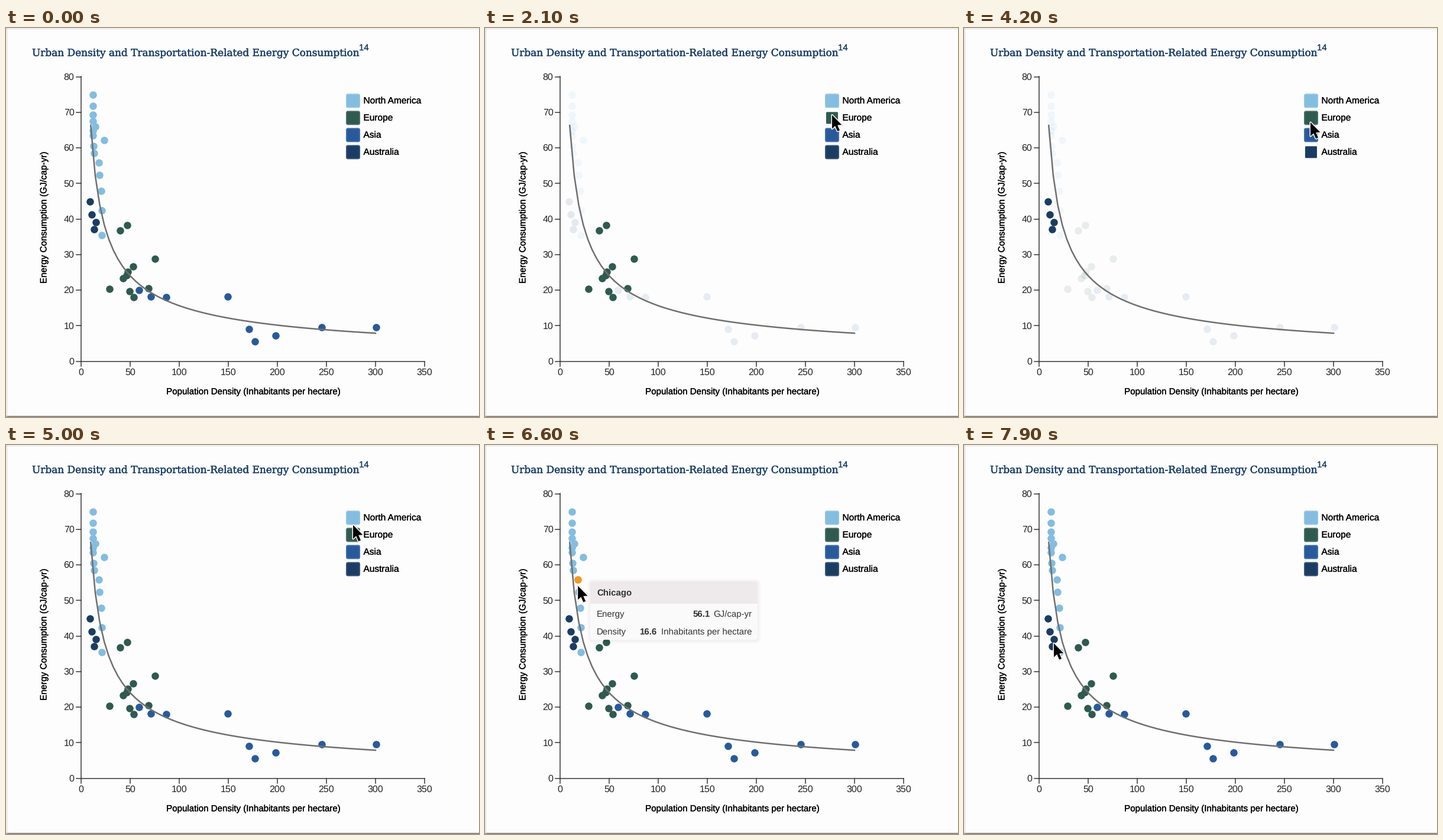
These frames come from a looping animation (800 by 659 pixels, 8 s). A matplotlib script:

```python
import numpy as np
import matplotlib.pyplot as plt
from matplotlib.animation import FuncAnimation
from matplotlib.patches import FancyBboxPatch, Polygon, Rectangle
from matplotlib.patheffects import withStroke

W, H, DPI = 800, 659, 64
FRAMES, STEP = 80, 100
SANS, SERIF = "Liberation Sans", "DejaVu Serif"
INK, NAVY, ORANGE, PAPER = "#222222", "#1d3f67", "#f5981d", "#fdfdfd"
X0, Y0, DX, DY = 127, 564.5, 1.66, 6.025
FADED = 0.1

plt.rcParams["text.hinting"] = "none"
plt.rcParams["text.hinting_factor"] = 1


def pt(px):
    return px * 72 / DPI


def to_px(x, y):
    return X0 + DX * x, Y0 - DY * y


fig = plt.figure(figsize=(W / DPI, H / DPI), dpi=DPI, facecolor=PAPER)
ax = fig.add_axes([0, 0, 1, 1])
ax.set(xlim=(0, W), ylim=(H, 0))
ax.axis("off")


def line(xs, ys, color="#333333", width=1.5, **kw):
    ax.plot(xs, ys, color=color, lw=pt(width), **kw)


def text(x, y, s, size, color=INK, font=SANS, bolder=0, **kw):
    kw.setdefault("va", "baseline")
    label = ax.text(x, y, s, fontsize=pt(size), color=color, family=font, **kw)
    if bolder:
        label.set_path_effects([withStroke(linewidth=pt(bolder), foreground=color)])
    return label


def rounded(x, y, w, h, r, **kw):
    style = f"round,pad=0,rounding_size={r}"
    return ax.add_patch(FancyBboxPatch((x, y), w, h, boxstyle=style, lw=0, **kw))


# Page edges
line([0, W], [0.5, 0.5], "#dcdcdc", 1)
for x in (0.5, W - 0.5):
    line([x, x], [0, H], "#d2d2d2", 1)
ax.add_patch(Rectangle((0, 657), W, 2, color="#8c8c8c", lw=0))

# Titles and axes
text(44, 47.5, "Urban Density and Transportation-Related Energy Consumption",
     16.93, NAVY, SERIF, 0.45)
text(597, 38, "14", 15, NAVY, bolder=0.2)
text(417.5, 620.5, "Population Density (Inhabitants per hectare)", 15.1,
     "black", bolder=0.25, ha="center")
text(64.5, 323.5, "Energy Consumption (GJ/cap-yr)", 15.3, "black", bolder=0.25,
     ha="center", va="center", rotation=90)
line([X0, X0], [82, Y0])
line([X0, 708], [Y0, Y0])
for v in range(0, 81, 10):
    y = to_px(0, v)[1]
    line([X0 - 8, X0], [y, y])
    text(115.5, y + 5.2, v, 16, ha="right")
for v in range(0, 351, 50):
    x = to_px(v, 0)[0]
    line([x, x], [Y0, Y0 + 8])
    text(x, 587.5, v, 16, ha="center")


def trend(density):
    return 66.3 * (9.8 / density) ** 0.6226


dens = np.linspace(9.8, 300, 64)
line(*to_px(dens, trend(dens)), "#6f6f6f", 2.5, zorder=4)


# Cities as (densities, energies)
def america():
    """A steep column that falls off at both ends and leans right below."""
    i = np.arange(15)
    u = (i - 7) / 7
    energy = 62.2 - 10.2 * u - 7 * u**2 - 9.5 * u**3
    lean = 9.4 / (1 + np.exp(1.3 * (10.4 - i)))
    spikes = 11.5 * np.exp(-((i - 7) / 2.5) ** 2) * (i % 3 == 1)
    return 12 + lean + spikes, energy


def australia():
    i = np.arange(4)
    turn = i * np.pi / 2
    return 12 - 2.9 * np.cos(turn) - np.sin(turn), 44.9 - 3.6 * i**0.71


def europe():
    return ([46.7, 40, 75, 53.2, 47.3, 46.1, 42.5, 28.7, 49.1, 68.5, 53.7],
            [38.2, 36.7, 28.8, 26.7, 25.2, 24.1, 23.3, 20.3, 19.7, 20.5, 18])


def asia():
    return ([59, 71, 87, 149.4, 171, 177, 198, 245, 300.5],
            [20, 18.2, 18, 18.1, 9, 5.5, 7.3, 9.5, 9.5])


REGIONS = {
    "North America": ("#83bde0", america),
    "Europe": ("#2f5a50", europe),
    "Asia": ("#285a9b", asia),
    "Australia": ("#1b3d63", australia),
}

spots, dots, frames, legend_y = {}, {}, {}, {}
for i, (name, (color, cities)) in enumerate(REGIONS.items()):
    spots[name] = np.column_stack(to_px(*map(np.array, cities())))
    dots[name] = ax.scatter(*spots[name].T, s=pt(12.5) ** 2, color=color, lw=0,
                            zorder=3)
    cy = legend_y[name] = 123.3 + 29 * i
    frames[name] = rounded(575, cy - 12, 24, 24, 3.5, color=color, alpha=0.88)
    rounded(577, cy - 10, 20, 20, 1.5, color=color)
    text(604.5, cy + 4.5, name, 15.45, "black", bolder=0.25)
hot = ax.scatter([0], [0], s=pt(12.5) ** 2, color=ORANGE, lw=0, zorder=3.5)

# Tooltip parts with their offsets from its corner
TIP_W, TIP_H, HEAD = 283, 99, 38
tip_parts = []


def tip_box(x, y, w, h, r, color, alpha, z):
    box = rounded(x, y, w, h, r, color=color, alpha=alpha, zorder=z)
    tip_parts.append((box, x, y))


def tip_text(x, y, s="", **kw):
    label = text(x, y, s, 15.35, "#333333", zorder=7, **kw)
    tip_parts.append((label, x, y))
    return label


for g in range(6, 0, -1):
    tip_box(-g, 1 - g, TIP_W + 2 * g, TIP_H + 2 * g, 5 + g, "black", 0.009, 5)
tip_box(0, 0, TIP_W, TIP_H, 5, "#fcfbfb", 0.92, 6)
tip_box(0, 0, TIP_W, HEAD, 5, "#eeeaeb", 1, 6.1)
tip_box(0, HEAD - 7, TIP_W, 7, 0.01, "#eeeaeb", 1, 6.1)
city = tip_text(11, 24.5, weight="bold")
tip_text(11, 59.5, "Energy")
tip_text(11, 90, "Density")
energy = tip_text(202.3, 59.5, weight="bold", ha="right")
density = tip_text(112.3, 90, weight="bold", ha="right")
tip_text(273, 59.5, "GJ/cap-yr", ha="right")
tip_text(273, 90, "Inhabitants per hectare", ha="right")

# Mouse pointer: soft shadow, white rim, black body
ARROW = np.array([(0, 0), (0, 23.5), (5.2, 18.6), (9.2, 27.6), (13, 26),
                  (9.2, 17.2), (16.4, 16.8)])
pointer = [ax.add_patch(Polygon(ARROW, color=c, lw=pt(w), alpha=a,
                                joinstyle="round", zorder=8))
           for c, w, a in (("black", 4.5, 0.12), ("white", 3, 1), ("black", 0, 1))]

# Schedule in tenths of a second: (first, last, ...)
HOVERS = [(8, 22, "Europe"), (23, 33, "Asia"), (34, 42, "Australia"),
          (43, 49, "North America")]
TIPS = [(59, 66, "Chicago", 56.1, 16.6, 10), (68, 72, "Calgary", 47.1, 20.8, 12)]


def pointer_stops():
    """Enter, rest on each legend swatch, visit both cities, drift down."""
    stops = [(5, 668, 560)]
    for first, last, name in HOVERS:
        y = legend_y[name]
        stops += [(first, 585, y - 9), (last - 1, 587, y - 5)]
    stops.append((50, 587, 135.5))
    for first, last, *_, i in TIPS:
        x, y = spots["North America"][i]
        stops.append((first, x - 1, y - 2))
    stops.insert(-1, (65, *stops[-2][1:]))
    return np.array(stops + [(79, 152, 336)])


STOPS = pointer_stops()


def pointer_at(k):
    i = np.clip(np.searchsorted(STOPS[:, 0], k, "right") - 1, 0, len(STOPS) - 2)
    (t0, *a), (t1, *b) = STOPS[i], STOPS[i + 1]
    s = np.clip((k - t0) / (t1 - t0), 0, 1)
    return np.array(a) + (np.array(b) - a) * s * s * (3 - 2 * s)


def current(spans, k):
    return next((s for s in spans if s[0] <= k <= s[1]), None)


def draw(k):
    hover = current(HOVERS, k)
    active = hover[2] if hover else None
    for name in REGIONS:
        dots[name].set_alpha(1 if active in (None, name) else FADED)
        frames[name].set_visible(name != active)

    tip = current(TIPS, k)
    for part in [hot] + [p[0] for p in tip_parts]:
        part.set_visible(tip is not None)
    if tip:
        first, _, name, e, d, i = tip
        hot.set_offsets(spots["North America"][i])
        city.set_text(name)
        energy.set_text(e)
        density.set_text(d)
        corner = np.round(pointer_at(first)) + (22, 5)
        for part, x, y in tip_parts:
            part.set(x=corner[0] + x, y=corner[1] + y)

    for part in pointer:
        part.set_visible(k >= STOPS[0, 0])
        part.set_xy(ARROW + pointer_at(k))
    return []


anim = FuncAnimation(fig, draw, frames=FRAMES, interval=STEP, repeat=True,
                     repeat_delay=0, init_func=lambda: draw(0))
plt.show()
```
